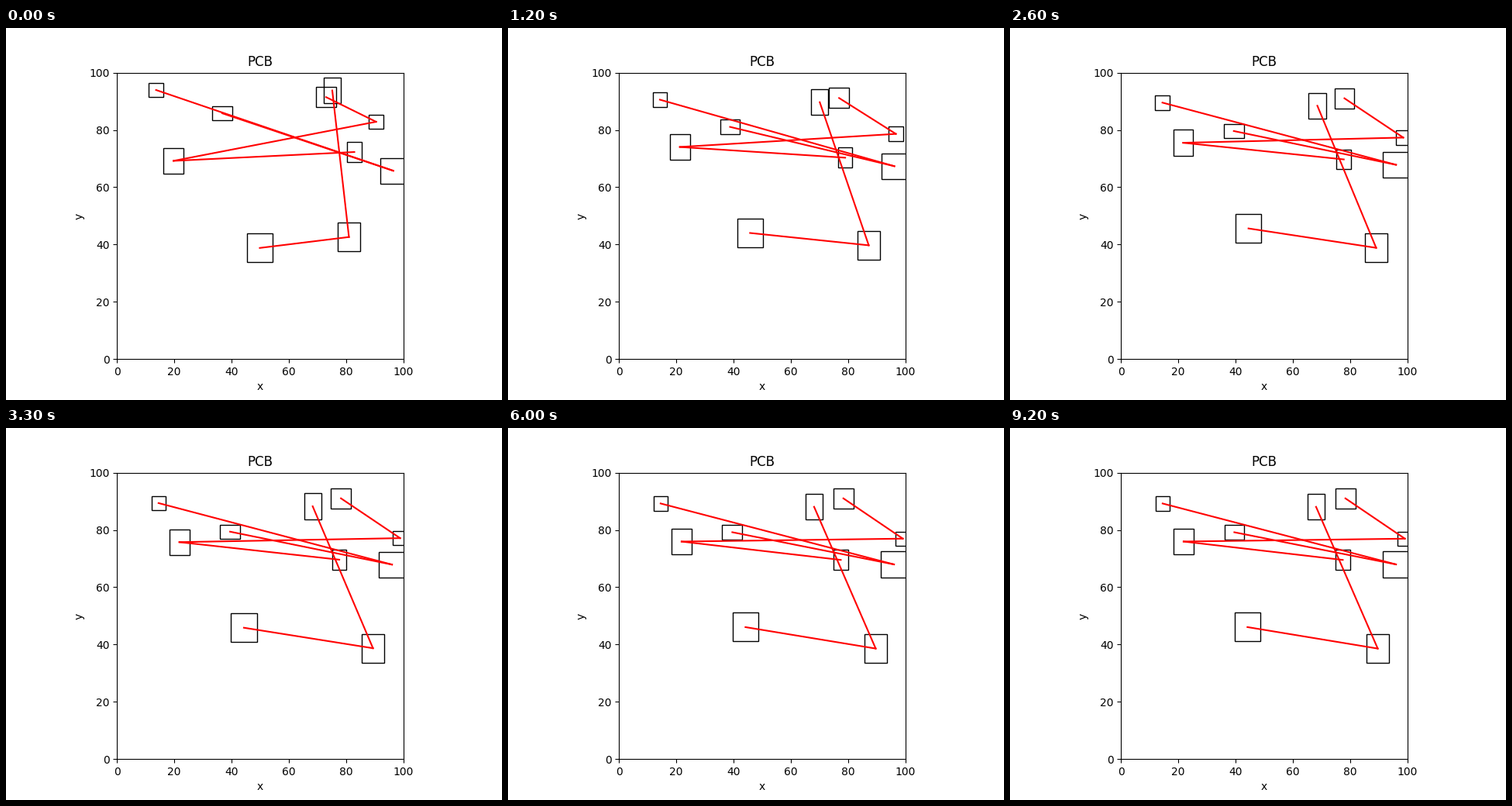
A matplotlib script for the animation above (9.3 s loop, 640 by 480 pixels).

```python
import numpy as np
import matplotlib.pyplot as plt
from matplotlib.animation import FuncAnimation
from matplotlib.patches import Rectangle

FRAMES = 93
INTERVAL = 100
DECAY = 0.9  # share of the remaining distance kept each step

# name: (width, height), start centre, resting centre
PARTS = {
    "A": ((5, 5), (13.64, 93.94), (14.53, 89.23)),
    "B": ((9, 9), (96.46, 65.75), (96.00, 67.97)),
    "C": ((7, 5), (36.77, 85.80), (39.5663, 79.19)),
    "D": ((7, 9), (19.75, 69.21), (21.86, 75.95)),
    "E": ((5, 5), (90.45, 82.85), (99.11, 76.95)),
    "F": ((5, 7), (82.87, 72.29), (77.44, 69.53)),
    "G": ((7, 7), (73.00, 91.45), (78.35, 91.02)),
    "H": ((6, 9), (75.16, 93.78), (68.10, 88.07)),
    "I": ((8, 10), (80.98, 42.61), (89.64, 38.58)),
    "J": ((9, 10), (49.86, 38.80), (44.14, 46.08)),
}
WIRES = ["AB", "CB", "DE", "DF", "EG", "HI", "IJ"]

fig, ax = plt.subplots(figsize=(6.4, 4.8), dpi=100)
ax.set(xlim=(0, 100), ylim=(0, 100), aspect="equal",
       title="PCB", xlabel="x", ylabel="y")

boxes = {
    name: ax.add_patch(Rectangle((0, 0), *size, fill=False, ec="black", lw=1))
    for name, (size, _, _) in PARTS.items()
}
lines = {wire: ax.plot([], [], color="red", lw=1.5)[0] for wire in WIRES}


def centre(name, step):
    _, start, rest = PARTS[name]
    start, rest = np.array(start), np.array(rest)
    return rest + (start - rest) * DECAY ** step


def draw(step):
    spots = {name: centre(name, step) for name in PARTS}
    for name, box in boxes.items():
        box.set_xy(spots[name] - np.array(PARTS[name][0]) / 2)
    for (a, b), line in lines.items():
        line.set_data(*zip(spots[a], spots[b]))
    return [*boxes.values(), *lines.values()]


anim = FuncAnimation(fig, draw, frames=FRAMES, interval=INTERVAL,
                     repeat=True, repeat_delay=0)
plt.show()
```
